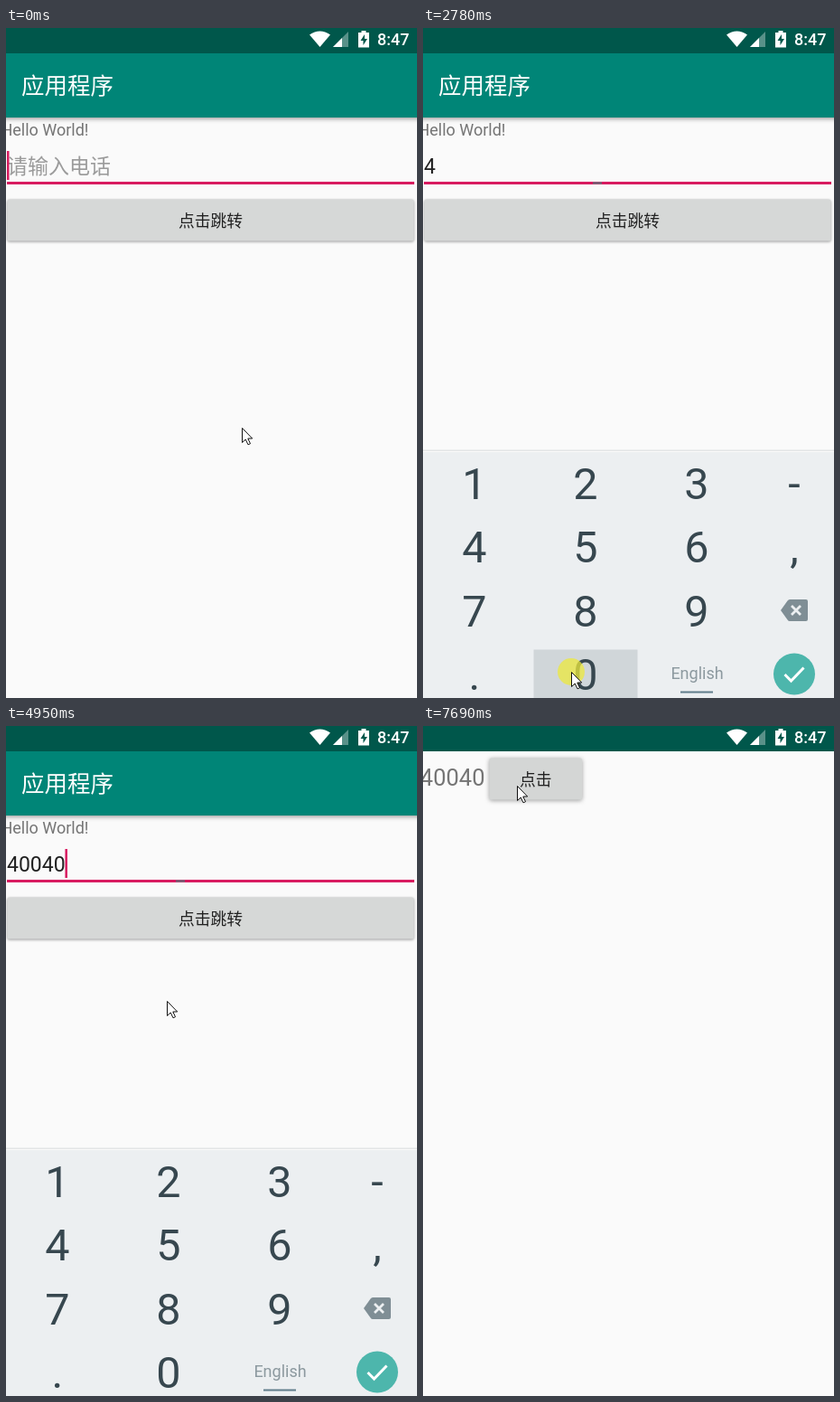
An HTML page with a canvas that plays this animation: 455x741 px, repeating every 8 s.

```html
<!DOCTYPE html>
<html lang="zh-CN">
<head>
<meta charset="utf-8">
<style>
html, body { margin: 0; width: 100%; height: 100%; overflow: hidden; background: #fafafa; }
canvas { display: block; }
</style>
</head>
<body>
<canvas id="stage" width="455" height="741"></canvas>
<script>
const ctx = document.getElementById('stage').getContext('2d');
const W = 455, H = 741, LOOP = 8000;
const FONT = 'Roboto, "Noto Sans CJK SC", "Noto Sans CJK", sans-serif';
const NUMBER = '40040';
const PINK = '#d81b60', KEY_INK = '#37474f';

// pointer path: time, x, y
const POINTER = [
  [0, 261, 442], [840, 188, 156], [1240, 188, 156], [1780, 69, 556], [1980, 58, 560],
  [2180, 58, 560], [2700, 164, 712], [3160, 164, 712], [3700, 52, 505], [3740, 52, 505],
  [3920, 54, 560], [4080, 54, 560], [4540, 166, 716], [4700, 166, 716], [4950, 178, 304],
  [5440, 190, 214], [6310, 190, 214], [7080, 90, 55], [7390, 104, 66], [LOOP, 104, 66]
];
// key presses: down, up, key centre x, key centre y
const PRESSES = [
  [2010, 2150, 57, 574], [2720, 2880, 180, 715], [3010, 3150, 180, 715],
  [3930, 4060, 57, 574], [4560, 4690, 180, 715]
];
const TAPS = [[840, 920], [5510, 5680], ...PRESSES];
const CARET_RESETS = [-200, 1300, ...PRESSES.map(p => p[1])];

const clamp = v => Math.max(0, Math.min(1, v));
const span = (t, from, to) => clamp((t - from) / (to - from));
const easeOut = v => 1 - (1 - v) ** 3;
const smooth = v => v * v * (3 - 2 * v);
const within = (t, [from, to]) => t >= from && t < to;

function rect(x, y, w, h, color) {
  ctx.fillStyle = color;
  ctx.fillRect(x, y, w, h);
}

function disc(x, y, r, color) {
  ctx.fillStyle = color;
  ctx.beginPath();
  ctx.arc(x, y, r, 0, 7);
  ctx.fill();
}

function shape(path, fill, stroke, width) {
  const p = new Path2D(path);
  if (fill) { ctx.fillStyle = fill; ctx.fill(p); }
  if (stroke) { ctx.strokeStyle = stroke; ctx.lineWidth = width; ctx.stroke(p); }
}

function text(str, x, y, size, color, align = 'left', weight = 400) {
  ctx.font = `${weight} ${size}px ${FONT}`;
  ctx.textAlign = align;
  ctx.fillStyle = color;
  ctx.fillText(str, x, y);
}

function shadow(color, blur, dy) {
  ctx.shadowColor = color;
  ctx.shadowBlur = blur;
  ctx.shadowOffsetY = dy;
}

function button(x, y, w, h, label, color, blur) {
  ctx.save();
  shadow('rgba(0,0,0,.38)', blur, 1);
  ctx.fillStyle = color;
  ctx.beginPath();
  ctx.roundRect(x, y, w, h, 2);
  ctx.fill();
  ctx.restore();
  return () => text(label, x + w / 2, y + 30, 17.8, '#212121', 'center');
}

function statusBar() {
  rect(0, 0, W, 28, '#00574b');
  shape('M336 7.5Q347.500 -.5 359 7.500L347.500 21Z', '#fff');
  shape('M379 4V21H362Z', 'rgba(255,255,255,.35)');
  shape('M372 11V21H362Z', '#fff');
  shape('M390 5H393.500V3H398.500V5H402V21.500H390Z', '#fff');
  shape('M397 7L392.500 14H395.500V19L400 12H397Z', '#00574b');
  text('8:47', 411, 19.300, 18, '#fff', 'left', 500);
}

function caretVisible(t) {
  if (t >= 5200) return false;
  const last = CARET_RESETS.filter(r => r <= t).pop();
  return (t - last) % 1000 < 500;
}

function formPage(t) {
  ctx.save();
  shadow('rgba(0,0,0,.4)', 5, 1.5);
  rect(-9, 28, W + 18, 71, '#008577');
  ctx.restore();
  text('应用程序', 17, 73, 25.5, '#fff');
  text('Hello World!', 91.5, 118.5, 18, '#757575', 'right');

  const typed = NUMBER.slice(0, PRESSES.filter(p => t >= p[1]).length);
  if (typed) text(typed, 1, 161, 23, '#212121');
  else text('请输入电话', 1, 161, 23, '#9b9b9b');
  rect(1, 170, 451, 3, PINK);
  if (t >= 1240) rect(188, 170.500, 10, 2, '#62717a');
  if (caretVisible(t)) {
    ctx.font = `23px ${FONT}`;
    rect(typed ? ctx.measureText(typed).width + .8 : 1, 136, 2.5, 32, PINK);
  }

  const label = button(1.500, 189.500, 450, 46, '点击跳转', '#d6d8d7', 3);
  if (t >= 5680) {
    ctx.save();
    ctx.beginPath();
    ctx.rect(1.500, 189.500, 450, 46);
    ctx.clip();
    rect(0, 189, W, 48, 'rgba(0,0,0,.006)');
    disc(200, 213, 30 + 92 * span(t, 5680, 6160), 'rgba(0,0,0,.012)');
    ctx.restore();
  }
  label();
}

function keyboard(t) {
  const hidden = 1 - easeOut(span(t, 1240, 1480)) + span(t, 6310, 6520) ** 2;
  if (hidden >= 1) return;
  ctx.save();
  ctx.translate(0, hidden * 273);
  rect(0, 466.500, W, 1.5, '#e3e5e6');
  rect(0, 469, W, 280, '#eceff1');
  for (const p of PRESSES) {
    if (within(t, p)) rect(p[2] - 57.5, p[3] - 27.5, 115, 55, '#d0d6d9');
  }
  ['123-', '456,', '789', '.0'].forEach((row, r) => {
    [...row].forEach((ch, c) =>
      text(ch, [57, 180, 303, 411][c], 521 + r * 70.4, 48.5, KEY_INK, 'center'));
  });
  text('English', 303.500, 720, 18, '#8c999f', 'center');
  rect(285, 733.500, 36, 2, '#607d8b');
  shape('M396 644L403.500 633.500Q404.500 632 406 632H424Q426 632 426 634V654Q426 656 424 656H406Q404.500 656 403.500 654.500Z', '#7f8e95');
  shape('M408 639L418 649M418 639L408 649', null, '#eceff1', 2.8);
  disc(411, 714.500, 23, '#4db6ac');
  shape('M400.500 715L407.500 722L421.500 707.500', null, '#fff', 3);
  ctx.restore();
}

function resultPage(t) {
  const shown = span(t, 6310, 6510);
  if (!shown) return;
  ctx.save();
  ctx.globalAlpha = shown;
  ctx.translate(0, 57 * (1 - easeOut(span(t, 6310, 6660))));
  rect(0, 28, W, H, '#fafafa');
  text(NUMBER, 68.5, 65.5, 25.5, '#757575', 'right');
  button(73.500, 35.500, 102.500, 46, '点击', '#d4d6d5', 5)();
  ctx.restore();
}

function pointer(t) {
  const i = POINTER.findIndex(p => p[0] > t);
  const [t0, x0, y0] = POINTER[i - 1], [t1, x1, y1] = POINTER[i];
  const k = smooth(span(t, t0, t1));
  const x = Math.round(x0 + (x1 - x0) * k), y = Math.round(y0 + (y1 - y0) * k);
  if (TAPS.some(tap => within(t, tap))) disc(x, y, 15, 'rgba(236,232,60,.75)');
  ctx.save();
  ctx.translate(x + .5, y + .5);
  shape('M0 0V16L3.700 12.500L6.500 18.300L9 17.200L6.300 11.500H11.200Z', '#fff', '#111', 1);
  ctx.restore();
}

function draw(now) {
  const t = now % LOOP;
  rect(0, 0, W, H, '#fafafa');
  formPage(t);
  resultPage(t);
  keyboard(t);
  statusBar();
  pointer(t);
}

const start = performance.now();
function tick() {
  draw(performance.now() - start);
  requestAnimationFrame(tick);
}
tick();
</script>
</body>
</html>
```
